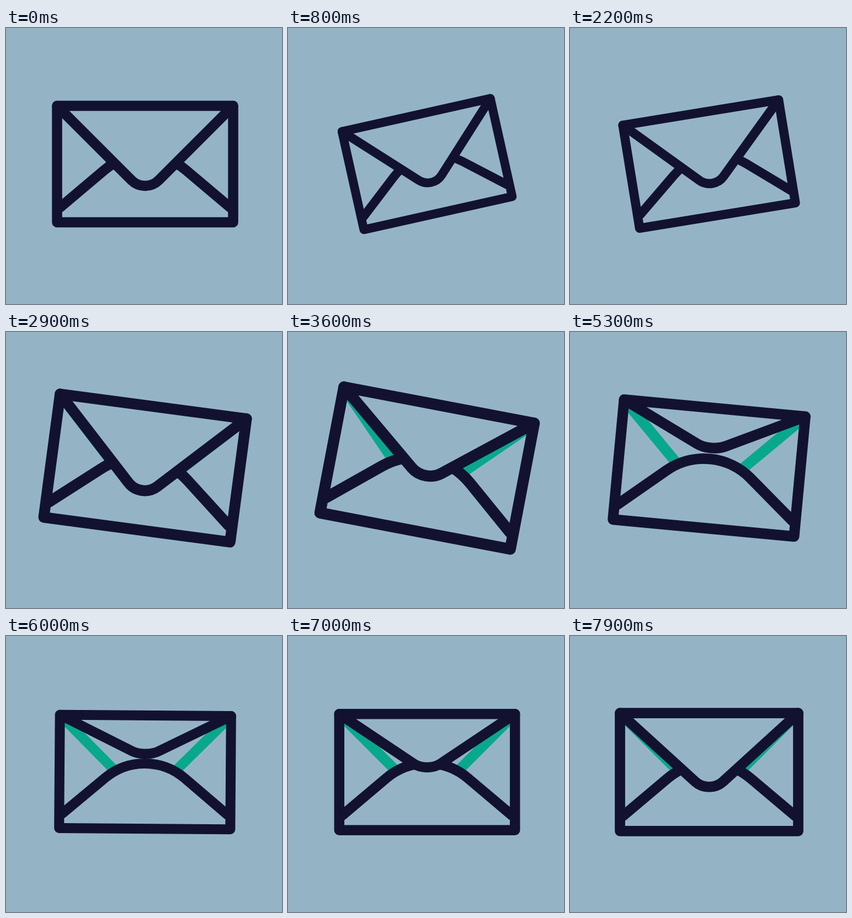
Recreate the animation shown at these times as an HTML page. Size 500 by 500 pixels, loop 8000 ms.

```html
<!DOCTYPE html>
<html lang="en">
<head>
<meta charset="utf-8">
<title>Envelope</title>
<style>
  html, body { margin: 0; width: 100%; height: 100%; overflow: hidden; background: #94b4c6; }
  svg { display: block; width: 100vw; height: 100vh; }
  path { fill: #94b4c6; stroke: #121230; stroke-width: 18.5; stroke-linejoin: round; stroke-linecap: round; }
  .lining { stroke: #08a88c; }
  .cover { stroke: none; }
  .line { fill: none; }
</style>
</head>
<body>
<svg viewBox="0 0 500 500">
  <g id="envelope">
    <path class="lining" d="M-159.5-105.5L-24.7 29.3A35 35 0 0 0 24.7 29.3L159.5-105.5"/>
    <path class="cover" d="M-154 78.5L-74 11A115 115 0 0 1 74 11L154 78.5V105H-154Z"/>
    <path class="line" d="M-154 78.5L-74 11A115 115 0 0 1 74 11L154 78.5"/>
    <path id="flap"/>
    <path class="line" d="M-159.5-105.5H159.5V105.5H-159.5Z"/>
  </g>
</svg>
<script>
const LOOP = 8000, STEP = 100;
const envelope = document.getElementById('envelope');
const flap = document.getElementById('flap');

const soft = p => p * p * (3 - 2 * p);
const late = p => soft(p ** 1.4);
const strong = p => p < 0.5 ? 8 * p ** 4 : 1 - 8 * (1 - p) ** 4;

// Swing back, lunge forward, then settle; each pose is eased into.
const poses = [
  { time: 0, angle: 0, scale: 1 },
  { time: 1150, angle: -13.5, scale: 0.853, ease: strong },
  { time: 3880, angle: 10.8, scale: 1.1, ease: strong },
  { time: 6200, angle: 0, scale: 0.967, ease: late },
  { time: 7600, angle: 0, scale: 1.018, ease: soft },
  { time: 8400, angle: 0, scale: 1, ease: soft },
];

function poseAt(t) {
  const i = poses.findIndex(pose => pose.time > t);
  const from = poses[i - 1], to = poses[i];
  const e = to.ease((t - from.time) / (to.time - from.time));
  const mix = key => from[key] + (to[key] - from[key]) * e;
  return { angle: mix('angle'), scale: mix('scale') };
}

// Height of the flap: 1 is closed; it lifts and falls in one arc.
function flapHeight(t) {
  const p = Math.max(0, (t - 2850) / 5450);
  return 1 - 0.525 * Math.sin(Math.PI * p) ** 1.2;
}

function draw(now) {
  const t = Math.floor(now % LOOP / STEP) * STEP;
  const k = flapHeight(t), y = -105.5 + 134.8 * k;
  const { angle, scale } = poseAt(t);
  flap.setAttribute('d',
    `M-159.5 -105.5L-24.7 ${y}A35 ${35 * k} 0 0 0 24.7 ${y}L159.5 -105.5`);
  envelope.setAttribute('transform',
    `translate(252 246.5) rotate(${angle}) scale(${scale})`);
  requestAnimationFrame(draw);
}
draw(0);
</script>
</body>
</html>
```
